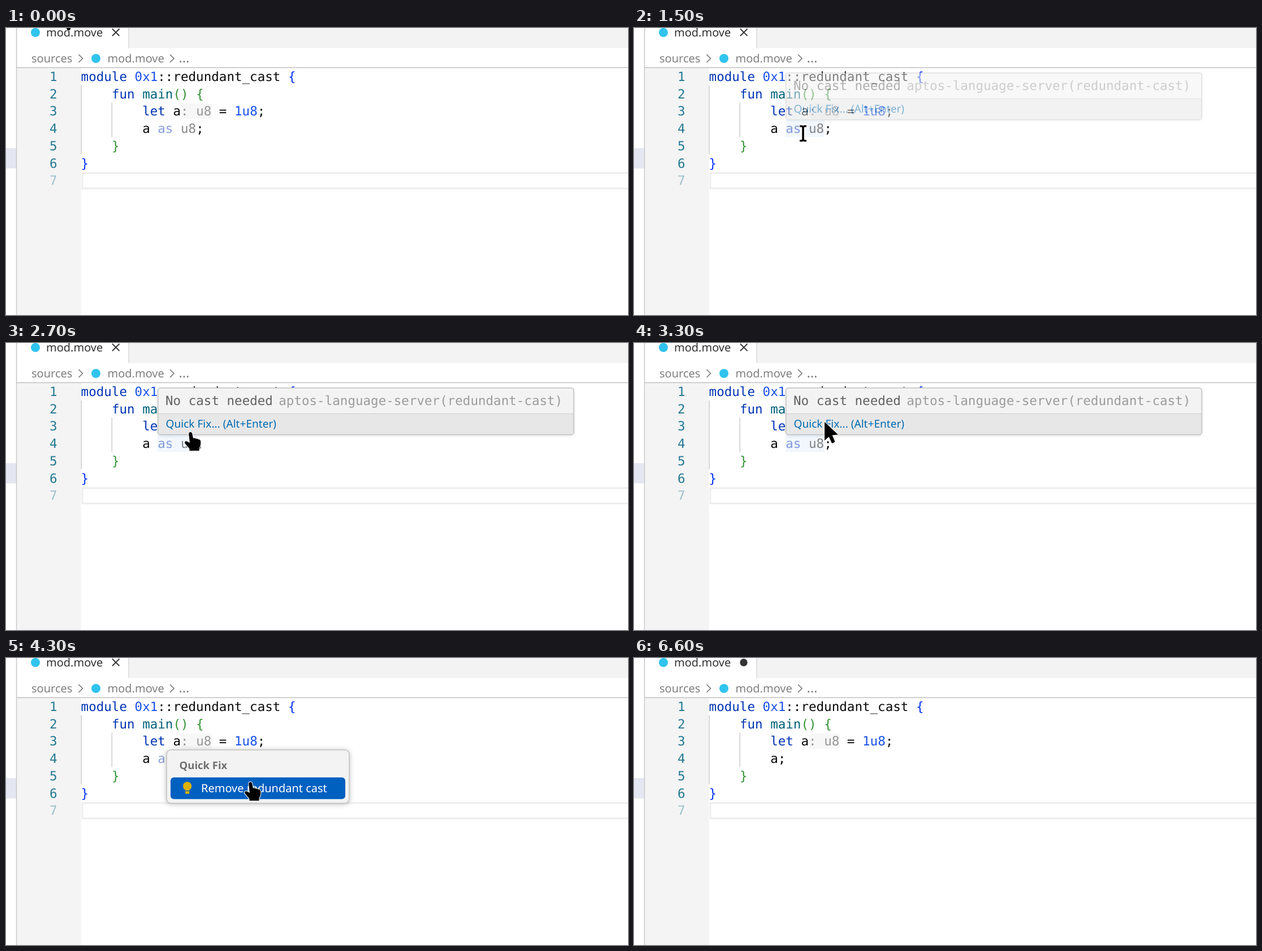
These frames come from a looping animation (1100 px wide and 509 px high, 7000 ms). An HTML page:

```html
<!DOCTYPE html>
<html lang="en">
<head>
<meta charset="utf-8">
<title>Redundant cast quick fix</title>
<style>
  html, body { margin: 0; width: 100%; height: 100%; overflow: hidden; background: #fff; }
  svg { display: block; width: 100vw; height: 100vh; }
  text { white-space: pre; text-rendering: geometricPrecision; }
  .ui { font-family: "Noto Sans", "Open Sans", sans-serif; font-size: 20px; }
  .mono { font-family: "DejaVu Sans Mono", monospace; font-size: 22.54px; }
  .menu { filter: drop-shadow(0 1px 4px rgba(0, 0, 0, .25)); }
  .tip { filter: drop-shadow(0 1px 2px rgba(0, 0, 0, .14)); }
  .cursor path { stroke: #fff; stroke-width: 2; stroke-linejoin: round; paint-order: stroke; }
</style>
</head>
<body>
<svg viewBox="0 0 1100 509" preserveAspectRatio="none">
  <rect width="1100" height="509" fill="#fff"/>
  <rect y="213" width="18" height="36" fill="#e4e6f1"/>
  <rect x="217" width="883" height="35.5" fill="#f3f3f3"/>
  <rect x="20" y="71" width="112.5" height="438" fill="#f4f4f4"/>
  <rect x="17.8" width="1.6" height="509" fill="#c8c8c8"/>
  <rect x="216.5" width="1.2" height="35.5" fill="#cfcfcf"/>
  <rect x="19" y="69.5" width="1081" height="1.6" fill="#c4c4c4"/>

  <circle cx="52" cy="8" r="8" fill="#30c4ee"/>
  <text class="ui" x="71" y="14.5" fill="#333">mod.move</text>
  <path id="close" d="M188 1.5l12.5 12.5M200.5 1.5l-12.5 12.5" stroke="#333" stroke-width="1.8"/>
  <circle id="dirty" cx="194" cy="8" r="6.7" fill="#333"/>

  <text id="crumb" class="ui" x="45" y="61">sources</text>
  <circle cx="159" cy="54" r="8" fill="#30c4ee"/>
  <text class="ui" x="179.5" y="61" fill="#7f7f7f">mod.move</text>
  <path d="M128.5 47l7 7-7 7M290 47l7 7-7 7" fill="none" stroke="#777" stroke-width="1.6"/>
  <text class="ui" x="305.5" y="61" fill="#7f7f7f" style="font-size:24px">…</text>

  <rect x="135" y="257.2" width="980" height="27.4" fill="none" stroke="#eee" stroke-width="3"/>
  <path d="M133.3 102v122M187.3 132.6v61" stroke="#cdcdcd" stroke-width="1.5"/>
  <rect x="310" y="134" width="54" height="27" rx="3" fill="#f7f7f7"/>
  <rect id="mark" x="268" y="163" width="69" height="30.5" fill="#f2f7fe"/>
  <g id="code" class="mono"></g>
  <rect id="caret" x="133" y="255" width="3" height="31" fill="#000"/>

  <g id="tip" class="tip">
    <rect x="268.7" y="79.8" width="735.3" height="82.6" rx="4.5" fill="#f3f3f3"/>
    <path d="M268.7 125.5h735.3v32.4a4.5 4.5 0 0 1-4.5 4.5h-726.3a4.5 4.5 0 0 1-4.5-4.5z" fill="#e7e7e7"/>
    <path d="M269 125.3h735" stroke="#d2d2d2" stroke-width="1.3"/>
    <rect x="268.7" y="79.8" width="735.3" height="82.6" rx="4.5" fill="none" stroke="#c4c4c4" stroke-width="1.5"/>
    <g class="mono">
      <text x="282" y="110" fill="#616161">No cast needed</text>
      <text x="482.3" y="110" fill="#9c9c9c">aptos-language-server(redundant-cast)</text>
    </g>
    <text class="ui" x="282.5" y="150" fill="#006ab1" style="font-size:19.1px">Quick Fix... (Alt+Enter)</text>
  </g>

  <g id="menu" class="menu">
    <rect x="284" y="163" width="323" height="94.5" rx="8" fill="#f3f3f3" stroke="#c4c4c4" stroke-width="1.5"/>
    <text class="ui" x="306.5" y="196.8" fill="#707070" style="font-size:18.5px;font-weight:700">Quick Fix</text>
    <rect x="291" y="211.8" width="309" height="38.4" rx="6" fill="#0060c0"/>
    <path d="M317 234a7.7 7.7 0 1 1 7.2 0v5q0 2-2 2h-3.2q-2 0-2-2z" fill="#ddb100"/>
    <path d="M317 235.6h7.2" stroke="#0060c0" stroke-width="1.2"/>
    <text class="ui" x="345" y="238" fill="#fff">Remove redundant cast</text>
  </g>

  <g id="arrow" class="cursor">
    <path d="M0 0V33L7.6 26.2L12.8 37.6Q15.6 38 18.4 35L13.6 23.6L24 22.6Z"/>
  </g>
  <g id="hand" class="cursor">
    <path d="M-3.8 3Q-3.5 0 -1 0Q1.8 0 2.4 3L4 11Q6.5 9.8 8.5 11.8Q11.3 10.6 13 13Q16.8 12.4 17.2 16.5Q18 24 14.6 28V33H-2.6V29.5Q-6.5 25-11 19.5Q-11.6 16-7.5 16.2L-2 19Z"/>
  </g>
  <g id="beam" class="cursor">
    <path d="M-6-14.5H-2Q0-14.5 0-13Q0-14.5 2-14.5H6V-11.5H3.5Q1.8-11.5 1.8-9.5V9.5Q1.8 11.5 3.5 11.5H6V14.5H2Q0 14.5 0 13Q0 14.5-2 14.5H-6V11.5H-3.5Q-1.8 11.5-1.8 9.5V-9.5Q-1.8-11.5-3.5-11.5H-6Z"/>
  </g>
</svg>
<script>
const LOOP = 7000, STEP = 100, CHAR = 13.57, LINE = 30.72;
const KEY = '#0033b3', NUM = '#1750eb', FN = '#00627a', OUTER = '#0431fa',
      INNER = '#319331', HINT = '#969696', INK = '#080808', FADED = .467;
const el = id => document.getElementById(id);

function put(x, row, str, fill, opacity = 1) {
  const t = document.createElementNS('http://www.w3.org/2000/svg', 'text');
  t.setAttribute('x', x);
  t.setAttribute('y', 94 + row * LINE);
  t.setAttribute('fill', fill);
  t.setAttribute('opacity', opacity);
  t.textContent = str;
  el('code').append(t);
  return t;
}
const code = (row, col, ...rest) => put(132.6 + col * CHAR, row, ...rest);

for (let i = 0; i < 7; i++) put(77, i, String(i + 1), '#237893', i === 6 ? .42 : 1);
code(0, 0, 'module', KEY);
code(0, 7, '0x1', NUM);
code(0, 10, '::redundant_cast', INK);
code(0, 27, '{', OUTER);
code(1, 4, 'fun', KEY);
code(1, 8, 'main', FN);
code(1, 12, '() {', INNER);
code(2, 8, 'let', KEY);
code(2, 12, 'a', INK);
code(2, 13, ': u8', HINT);
code(2, 18, '=', INK);
code(2, 20, '1u8', NUM);
code(2, 23, ';', INK);
code(3, 8, 'a', INK);
const cast = [
  code(3, 10, 'as', KEY, FADED),
  code(3, 13, 'u8', '#000', FADED),
  code(3, 15, ';', INK)
];
const fixed = code(3, 9, ';', INK);
code(4, 4, '}', INNER);
code(5, 0, '}', OUTER);

// Pointer stops: start time, shape, x, y
const stops = [
  [0, 'arrow', 96, -33], [500, 'arrow', 106, -18], [600, 'hand', 132, 26],
  [700, 'hand', 166, 70], [800, 'beam', 205, 113], [900, 'beam', 243, 146],
  [1000, 'beam', 273, 170], [1100, 'beam', 292, 183], [1200, 'beam', 299, 187],
  [2200, 'beam', 299, 187.5], [2300, 'beam', 302, 184], [2400, 'beam', 307, 179],
  [2500, 'beam', 313, 173], [2600, 'beam', 320, 167], [2700, 'hand', 327, 158],
  [2800, 'hand', 333, 153], [2900, 'hand', 336, 150], [3000, 'hand', 337, 142],
  [3200, 'arrow', 337, 140],
  [3900, 'arrow', 343, 145], [4000, 'arrow', 362, 162], [4100, 'arrow', 389, 186],
  [4200, 'hand', 415, 209], [4300, 'hand', 433, 220], [4400, 'hand', 434, 222],
  [4500, 'hand', 434, 224], [5000, 'beam', 434, 225],
  [6200, 'beam', 412, 206], [6300, 'beam', 342, 150], [6400, 'beam', 240, 88],
  [6500, 'hand', 135, 22], [6600, 'arrow', 96, -60]
];

const show = (node, on) => node.setAttribute('visibility', on ? 'visible' : 'hidden');

function draw(now) {
  const t = Math.floor(now % LOOP / STEP) * STEP;
  const within = (a, b) => t >= a && t < b;
  const done = t >= 4900;

  el('crumb').setAttribute('fill', within(600, 800) ? '#4e4e4e' : '#7f7f7f');
  show(el('close'), !done);
  show(el('dirty'), done);
  cast.forEach(n => show(n, !done));
  show(fixed, done);
  show(el('mark'), within(1500, 3400));
  show(el('tip'), within(1500, 3400));
  el('tip').setAttribute('opacity', t === 1500 ? .5 : 1);
  show(el('menu'), within(3400, 4900));
  show(el('caret'), within(3200, 3300) || within(4900, 5400) || within(5900, 6400));

  const [, shape, x, y] = stops.findLast(s => s[0] <= t);
  for (const id of ['arrow', 'hand', 'beam']) show(el(id), id === shape);
  el(shape).setAttribute('transform', `translate(${x} ${y})`);
}

const start = performance.now();
function tick() {
  draw(performance.now() - start);
  requestAnimationFrame(tick);
}
tick();
</script>
</body>
</html>
```
